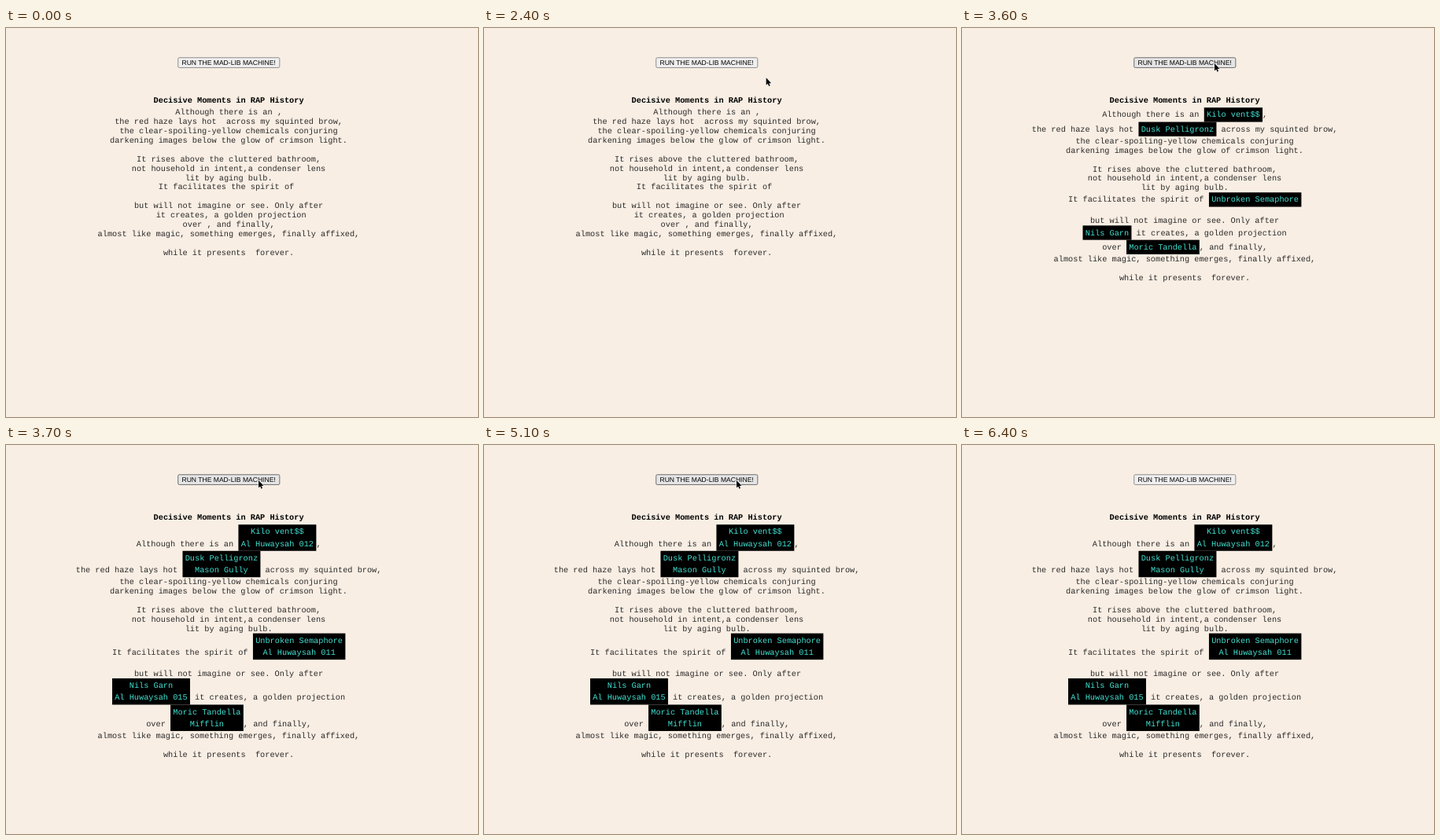
An HTML page with a canvas for the animation above (6500 ms loop, 600x495 px).

```html
<!DOCTYPE html>
<html lang="en">
<head>
<meta charset="utf-8">
<title>Mad-lib machine</title>
<style>
  html, body { margin: 0; height: 100%; overflow: hidden; background: #f8eee4; }
  canvas { display: block; }
</style>
</head>
<body>
<canvas id="stage" width="600" height="495"></canvas>
<script>
const ctx = document.getElementById('stage').getContext('2d');
const LOOP = 6500, STEP = 100;
const MID = 283.2, CHAR = 6.17, LINE = 11.9, PAD = 3.2, FIRST_ROW = 18.3, NEXT_ROW = 15.2;
const MONO = '10.28px "Courier New", "Liberation Mono", monospace';
const SANS = '8.57px Arial, "Liberation Sans", sans-serif';
const BUTTON = { x: 218.4, y: 37.4, w: 129.8, h: 13.4 };

// "@" marks a slot to be filled
const POEM = [
  'Although there is an @,',
  'the red haze lays hot @ across my squinted brow,',
  'the clear-spoiling-yellow chemicals conjuring',
  'darkening images below the glow of crimson light.',
  '',
  'It rises above the cluttered bathroom,',
  'not household in intent,a condenser lens',
  'lit by aging bulb.',
  'It facilitates the spirit of @',
  '',
  'but will not imagine or see. Only after',
  '@ it creates, a golden projection',
  'over @, and finally,',
  'almost like magic, something emerges, finally affixed,',
  '',
  'while it presents  forever.'
];
const FILLS = [
  ['Kilo vent$$', 'Al Huwaysah 012'],
  ['Dusk Pelligronz', 'Mason Gully'],
  ['Unbroken Semaphore', 'Al Huwaysah 011'],
  ['Nils Garn', 'Al Huwaysah 015'],
  ['Moric Tandella', 'Mifflin']
];
const PRESS = 3100, RELEASE = 3200, FILL_TIMES = [3300, 3700];

// pointer path: time, x, y
const PATH = [
  [1600, 599.8, 163], [1900, 480, 112], [2200, 390, 78], [2500, 343, 56],
  [2800, 323, 46], [2900, 321, 45], [5300, 321, 45], [5700, 329, 38], [5900, 341, 7]
];
const ARROW = [[0, 0], [0, 9.4], [2.1, 7.5], [3.5, 10.7], [5, 10.1], [3.7, 7], [6.5, 6.8]];

function pointerAt(t) {
  for (let i = 1; i < PATH.length; i++) {
    const [t0, x0, y0] = PATH[i - 1], [t1, x1, y1] = PATH[i];
    if (t >= t0 && t <= t1) {
      const k = (t - t0) / (t1 - t0);
      return { x: x0 + (x1 - x0) * k, y: y0 + (y1 - y0) * k };
    }
  }
  return null;
}

function write(text, x, y, color = '#2c2a28', font = MONO) {
  ctx.font = font;
  ctx.fillStyle = color;
  ctx.fillText(text, x, y);
}

function drawButton(t, p) {
  const { x, y, w, h } = BUTTON;
  const over = p && p.x > x && p.x < x + w && p.y > y && p.y < y + h;
  const pressed = over && t >= PRESS && t < RELEASE;
  const [face, edge] = pressed ? ['#f5f5f5', '#8d8d8d'] : over ? ['#e5e5e5', '#4f4f4f'] : ['#efefef', '#767676'];
  ctx.beginPath();
  ctx.roundRect(x + .35, y + .35, w - .7, h - .7, 1.6);
  ctx.fillStyle = face;
  ctx.fill();
  ctx.strokeStyle = edge;
  ctx.lineWidth = .8;
  ctx.stroke();
  write('RUN THE MAD-LIB MACHINE!', 223.5, 47, '#000', SANS);
}

function drawPoem(rows) {
  write('Decisive Moments in RAP History', MID - 15.5 * CHAR, 95.4, '#000', 'bold ' + MONO);
  let top = 101.25, slot = 0;
  for (const line of POEM) {
    const [before, after] = line.split('@');
    const words = after === undefined ? [] : FILLS[slot++].slice(0, rows);
    const boxW = words.length ? Math.max(...words.map(s => s.length)) * CHAR + 2 * PAD : 0;
    const height = words.length ? FIRST_ROW + (rows - 1) * NEXT_ROW : LINE;
    const base = top + height - (words.length ? FIRST_ROW : LINE) / 2 + 3;
    const left = MID - ((before + (after || '')).length * CHAR + boxW) / 2;
    const boxX = left + before.length * CHAR;
    write(before, left, base);
    if (after) write(after, boxX + boxW, base);
    if (words.length) {
      ctx.fillStyle = '#000';
      ctx.fillRect(boxX, top, boxW, height);
      words.forEach((word, i) => write(word, boxX + (boxW - word.length * CHAR) / 2,
        base - (rows - 1 - i) * NEXT_ROW, '#40e0d0'));
    }
    top += height;
  }
}

function drawPointer({ x, y }) {
  ctx.beginPath();
  for (const [dx, dy] of ARROW) ctx.lineTo(x + dx, y + dy);
  ctx.closePath();
  ctx.lineJoin = 'round';
  ctx.lineWidth = 1.2;
  ctx.strokeStyle = '#fff';
  ctx.stroke();
  ctx.fillStyle = '#000';
  ctx.fill();
}

function draw(now) {
  const t = Math.floor(now % LOOP / STEP) * STEP;
  const p = pointerAt(t);
  ctx.textRendering = 'geometricPrecision';
  ctx.fillStyle = '#f8eee4';
  ctx.fillRect(0, 0, 600, 495);
  drawButton(t, p);
  drawPoem(FILL_TIMES.filter(f => t >= f).length);
  if (p) drawPointer(p);
}

const start = performance.now();
function tick() {
  draw(performance.now() - start);
  requestAnimationFrame(tick);
}
tick();
</script>
</body>
</html>
```
